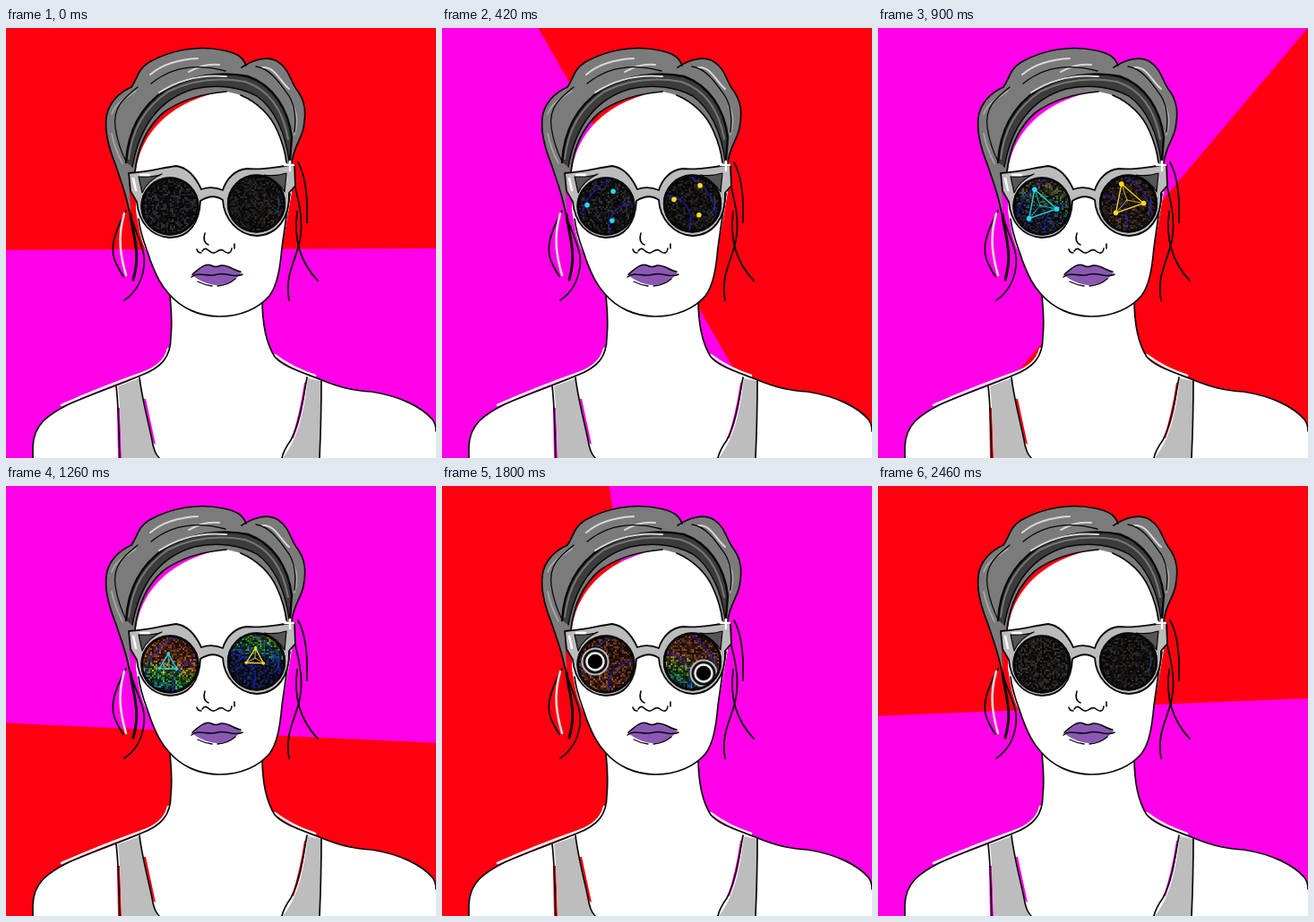
Animation of 480 by 480 pixels, one loop 2490 ms. Source, as an HTML page with a canvas:

```html
<!DOCTYPE html>
<html lang="en">
<head>
<meta charset="utf-8">
<title>Sunglasses</title>
<style>
html, body { margin: 0; width: 100%; height: 100%; overflow: hidden; }
canvas { display: block; }
</style>
</head>
<body>
<canvas id="stage" width="480" height="480"></canvas>
<script>
const ctx = document.getElementById('stage').getContext('2d');
const STEP = 30, STEPS = 83;
const RED = '#ff0010', MAGENTA = '#ff00e8', INK = '#080808';
const LENSES = [
  { x: 183, y: 199, r: 31.5, hub: [181, 198.3], color: '#20dce8', front: 41, ring: [171, 196], arcs: [212, 222, 58, 26] },
  { x: 279.5, y: 196, r: 31.5, hub: [278, 192], color: '#ffdc20', front: 59, ring: [292, 209], arcs: [250, 215, 28, 56] }
];

// Linear interpolation through [step, value] pairs
function track(n, ...keys) {
  if (n <= keys[0][0]) return keys[0][1];
  for (let i = 1; i < keys.length; i++) {
    const [a, from] = keys[i - 1], [b, to] = keys[i];
    if (n < b) return from + (to - from) * (n - a) / (b - a);
  }
  return keys[keys.length - 1][1];
}

function randomizer(seed) {
  return () => {
    seed = (seed + 0x6d2b79f5) | 0;
    let v = Math.imul(seed ^ (seed >>> 15), 1 | seed);
    v ^= v + Math.imul(v ^ (v >>> 7), 61 | v);
    return ((v ^ (v >>> 14)) >>> 0) / 4294967296;
  };
}

function fill(d, color) {
  ctx.fillStyle = color;
  ctx.fill(new Path2D(d), 'evenodd');
}

function line(d, width = 1.7, color = INK) {
  ctx.strokeStyle = color;
  ctx.lineWidth = width;
  ctx.stroke(new Path2D(d));
}

function circle(x, y, r, color) {
  ctx.fillStyle = color;
  ctx.beginPath();
  ctx.arc(x, y, r, 0, 7);
  ctx.fill();
}

function ring(x, y, r, width, color) {
  ctx.strokeStyle = color;
  ctx.lineWidth = width;
  ctx.beginPath();
  ctx.arc(x, y, r, 0, 7);
  ctx.stroke();
}

const LEFT_SHOULDER = 'M30 480V467C31 443 46 432 70 420C100 407 122 400 150 388C174 379 184 367 184 345C186 325 184 310 183 299';
const RIGHT_SHOULDER = 'M286 302C286 325 289 350 300 367C309 378 330 384 350 392C376 403 392 405 408 406C440 411 464 423 476 437Q480 442 480 450';
const SLIVERS = 'M124 424L127 424L129 480L125 480Z M153 414L156 414L167 465L163 462Z M333 396L335 396Q332 430 321 458L319 458Q328 430 333 396Z';
const FACE = 'M145 203V160C150 122 178 82 246 70C286 76 310 115 315 150L319 183C315 205 312 225 308 245C306 268 303 287 294 299C282 313 262 322 238 322C215 322 195 312 182 297C170 282 165 266 157 250C150 236 148 222 145 203Z';
const HAIR = 'M136 202C134 185 128 170 122 152C114 132 110 116 112 100C114 84 126 72 140 66C147 56 147 46 160 38C185 24 215 19 243 25C258 28 265 33 268 42C276 35 292 30 304 38C316 46 317 58 324 68C335 82 335 96 332 112C329 126 320 134 319 152L313 152C312 136 306 118 297 104C285 84 265 74 246 71C222 73 195 80 175 95C156 112 147 134 144 160L138 161C137 175 138 188 139 202Z';
const FRAME = 'M137 162C158 161 174 156 190 154C204 156 212 167 218 180Q230 176 242 181C246 168 256 158 269 157C288 159 305 154 322 153L323 176L316 184C317 212 303 231 280 232C258 231 243 212 242 192Q231 184 217 193C216 218 204 234 183 234C162 233 148 217 146 194L139 182Z';

function drawBackground(n) {
  ctx.fillStyle = RED;
  ctx.fillRect(0, 0, 480, 480);
  ctx.save();
  ctx.translate(240.6, 261.2);
  ctx.rotate(Math.max(-0.2, 4.375 * n - 1.1) * Math.PI / 180);
  ctx.fillStyle = MAGENTA;
  ctx.fillRect(-500, -14.4, 1000, 800);
  ctx.restore();
}

function drawBody() {
  fill(LEFT_SHOULDER + 'L286 302' + RIGHT_SHOULDER.replace('M286 302', '') + 'V480Z' + SLIVERS, '#fff');
  line('M62 421Q105 402 150 386Q177 377 181 358M300 365Q320 380 345 388', 2.5, '#fff');
  fill('M125 400L149 391C154 420 160 442 164 463L169 480H129C128 450 128 425 125 400Z', '#bdbdbd');
  fill('M337 391L352 394L350 480H309C327 457 332 430 337 391Z', '#bdbdbd');
  line(LEFT_SHOULDER);
  line(RIGHT_SHOULDER);
  line('M123 400C126 425 126 455 127 480M149 390C152 415 159 440 163 460Q165 474 171 480');
  line('M336 390C331 418 328 440 318 460Q310 471 308 480M352 393Q352 435 350 480');
}

function drawFace() {
  fill(FACE, '#fff');
  line('M148 213C150 232 157 246 161 259C168 278 173 287 182 297C195 312 215 322 238 322C262 322 282 313 294 299C303 287 306 268 308 245C311 225 313 208 317 185');
  line('M222 229Q219 239 226 242M213 247Q214 251 218 251M219 249C224 242 226 251 231 251C235 252 237 246 242 248C247 252 251 253 252 246M255 241V246', 1.6);
  fill('M207 276C215 269 222 262 229 265Q234 268 240 265C249 264 254 271 263 273C255 283 247 287 235 287C222 286 216 281 207 276Z', '#8b58b4');
  line('M208 275C215 269 222 262 229 265Q234 268 240 265C249 264 254 271 262 272M207 278C216 271 225 279 236 275C246 272 254 280 264 275', 1.5);
  line('M214 283Q222 287 230 288M236 288Q248 287 256 280', 1.3);
}

function drawHair() {
  fill(HAIR, '#7b7b7b');
  fill('M134 150C136 115 150 88 178 69C205 53 240 48 270 54C298 64 315 90 319 122L317 148C312 118 300 90 280 76C262 66 235 62 210 68C175 78 150 105 141 155Z', '#3c3c3c');
  line('M137 146C141 112 155 89 181 71C208 58 238 55 267 60C294 69 309 91 315 124', 2, '#777');
  line('M134 150C136 115 150 88 178 69C205 53 240 48 270 54C298 64 315 90 319 122L317 148', 2.4);
  line('M141 155C150 105 175 78 210 68C235 62 262 66 280 76C300 90 312 118 316 148', 1.5);
  line('M161 52C174 41 190 35 214 34M204 49Q221 39 238 41M286 44C300 43 304 57 316 68M171 72Q205 50 246 54', 2, '#d8d8d8');
  line('M118 96C123 82 137 77 145 70M118 118Q121 134 130 151M320 87Q328 99 322 119', 1.6, '#aaa');
  line('M144 160C147 134 156 112 175 95C195 80 222 73 246 71M262 75C281 83 296 98 303 115Q311 133 313 150');
  line('M137 202C134 185 128 170 122 152C114 132 110 116 112 100C114 84 126 72 140 66C147 56 147 46 160 38C185 24 215 19 243 25C258 28 265 33 268 42M263 44C275 36 292 30 304 38C316 46 317 58 324 68C335 82 335 96 332 112C329 126 320 134 319 152');
  line('M147 66C132 78 119 88 122 111Q125 131 134 149M279 43C295 45 306 62 316 76Q325 91 322 116M162 62C185 43 212 39 245 48', 1.3);
  line('M134 204C119 232 115 249 124 265Q128 273 131 277M137 202C142 226 157 246 154 266Q151 291 132 304', 1.8);
  line('M139 208C141 230 151 250 142 281', 3);
  line('M132 207C124 234 128 255 134 276', 2.6, '#ddd');
  line('M326 150C334 164 337 188 336 217M323 178C328 198 332 218 328 237C323 262 311 275 316 304M325 205C321 235 328 261 348 282', 1.8);
}

function drawFrames() {
  fill(FRAME, '#bcbcbc');
  line(FRAME, 1.8);
  fill('M148 166Q164 167 174 163Q158 170 152 184Z', '#555');
  fill('M288 164Q300 166 313 162L311 183Q303 170 288 164Z', '#555');
  line('M148 166Q164 167 174 163Q158 170 152 184ZM288 164Q300 166 313 162L311 183Q303 170 288 164Z', 1.2);
  line('M142 168L145 181M150 164H160M311 153H321M317 149V159', 2.4, '#fff');
}

function drawNoise(lens, n, seed) {
  const random = randomizer(n * 131 + seed);
  const tint = track(n, [18, 0], [30, 0.35], [42, 0.85], [60, 0.8], [72, 0]);
  const front = seed && n < 36 ? 1 : (n - lens.front) / 15;
  for (let y = -32; y < 32; y += 2) {
    for (let x = -32; x < 32; x += 2) {
      const depth = (y - x * 0.25) / 32 - front + (random() - 0.5) * 0.4;
      const hue = Math.min(230, Math.max(18, 45 + depth * 190));
      const warmth = Math.max(0.35, 1 - Math.abs(depth) * 0.5);
      const light = 2 + random() ** 2 * (20 + 32 * tint * warmth) + tint * warmth * 7;
      ctx.fillStyle = `hsl(${hue} ${6 + tint * 60}% ${light}%)`;
      ctx.fillRect(lens.x + x, lens.y + y, 2, 2);
    }
  }
}

function drawTriangle(lens, n) {
  const dot = track(n, [5, 0], [11, 2.8], [32, 2.8], [42, 1.7], [51, 0]);
  if (!dot) return;
  const radius = track(n, [32, 19], [42, 11.2], [51, 0]);
  const turn = track(n, [0, -118], [14, -58], [30, 11], [42, 32], [51, 42]);
  const [cx, cy] = lens.hub;
  const points = [0, 120, 240].map(offset => {
    const a = (turn + offset) * Math.PI / 180;
    return [cx + radius * Math.cos(a), cy + radius * Math.sin(a)];
  });
  ctx.globalAlpha = track(n, [17, 0], [26, 1]);
  line('M' + points.join('L') + 'Z', 1.3, lens.color);
  line(points.map(p => `M${cx} ${cy}L${p}`).join(''), 0.8, lens.color);
  ctx.globalAlpha = 1;
  for (const [x, y] of points) circle(x, y, dot, lens.color);
}

function drawRings(lens, n) {
  const size = track(n, [49, 0], [57, 1], [65, 1], [71, 1.5]);
  if (!size) return;
  const [x, y] = lens.ring;
  ctx.globalAlpha = track(n, [65, 1], [71, 0]);
  circle(x, y, 15 * size, '#111');
  ring(x, y, 14.5 * size, 2, '#b8b8b8');
  ring(x, y, 9.5 * size, 2.4, '#eee');
  circle(x, y, 7.5 * size, '#000');
  ctx.globalAlpha = 1;
}

function drawLens(lens, n, seed) {
  const { x, y, r } = lens;
  circle(x, y, r + 1, INK);
  ctx.save();
  ctx.beginPath();
  ctx.arc(x, y, r - 1.5, 0, 7);
  ctx.clip();
  drawNoise(lens, n, seed);
  ctx.globalAlpha = track(n, [6, 0], [14, 0.6], [76, 0.6], [81, 0]);
  const [ax, ay, ...radii] = lens.arcs;
  for (const radius of radii) ring(ax, ay, radius, 2, '#2219b8');
  ctx.globalAlpha = 1;
  if (seed) line('M300 207Q307 202 304 188', 1.5, 'rgba(45,85,145,.6)');
  drawTriangle(lens, n);
  drawRings(lens, n);
  ctx.restore();
  ring(x, y, r, 2.4, INK);
}

function draw(now) {
  const n = Math.floor(now / STEP) % STEPS;
  drawBackground(n);
  drawBody();
  drawFace();
  drawHair();
  drawFrames();
  LENSES.forEach((lens, i) => drawLens(lens, n, i * 7919));
  requestAnimationFrame(draw);
}

ctx.lineCap = ctx.lineJoin = 'round';
draw(0);
</script>
</body>
</html>
```
